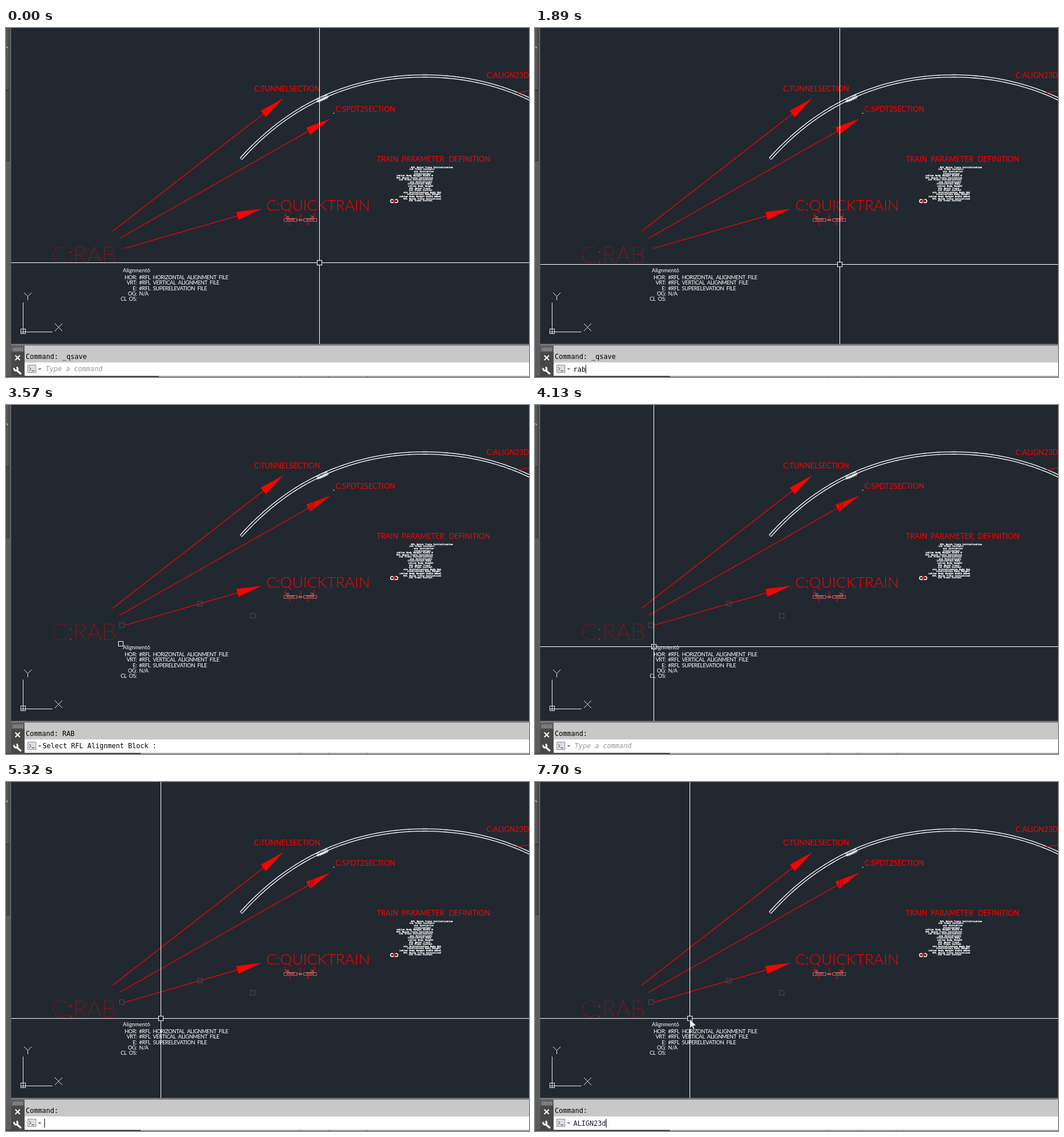
An HTML page with a canvas for the animation above (8000 ms loop, 900 by 600 pixels).

```html
<!DOCTYPE html>
<html lang="en">
<head>
<meta charset="utf-8">
<style>
html, body { margin: 0; width: 100%; height: 100%; overflow: hidden; background: #212830; }
canvas { display: block; }
</style>
</head>
<body>
<canvas id="stage" width="900" height="600"></canvas>
<script>
const ctx = document.getElementById('stage').getContext('2d');
const LOOP = 8000, TICK = 70;
const BG = '#212830', RED = '#ff0000', WHITE = '#ffffff';
const DRAFT = 'Lato, sans-serif', MONO = '"DejaVu Sans Mono", monospace';

// Input line: null shows the placeholder
const inputs = [
  [0, null], [1400, ''], [1470, 'r'], [1610, 'ra'], [1890, 'rab'],
  [2380, 'Select RFL Alignment Block :'], [4130, null], [5320, ''],
  [5390, 'A'], [5530, 'AL'], [5740, 'ALI'], [5880, 'ALIG'], [6090, 'ALIGN'],
  [6930, 'ALIGN2'], [7490, 'ALIGN23'], [7700, 'ALIGN23d']
];
const history = [[0, 'Command: _qsave'], [2380, 'Command: RAB'], [4130, 'Command:']];

// Pointer path: time, x, y
const path = [
  [0, 539, 403], [210, 524, 406], [2660, 524, 406], [2940, 424, 362],
  [3080, 333, 341], [3150, 285, 335], [3290, 199, 378], [3360, 172, 395],
  [3500, 196, 409], [3570, 197, 410], [3780, 204, 415], [4200, 204, 415],
  [4480, 266, 406], [LOOP, 266, 406]
];
const ghosts = [[3010, 424, 362], [3150, 333, 341], [3360, 199, 378]];

const latest = (list, t) => list.filter(entry => entry[0] <= t).pop()[1];
const within = (t, from, to) => t >= from && t < to;

function pointerAt(t) {
  const i = path.findIndex(p => p[0] > t);
  const [t0, x0, y0] = path[i - 1], [t1, x1, y1] = path[i];
  const k = (t - t0) / (t1 - t0);
  return [Math.round(x0 + (x1 - x0) * k), Math.round(y0 + (y1 - y0) * k)];
}

function rect(x, y, w, h, color) {
  ctx.fillStyle = color;
  ctx.fillRect(x, y, w, h);
}

function square(x, y, color = WHITE) {
  ctx.strokeStyle = color;
  ctx.lineWidth = 1;
  ctx.strokeRect(x - 3.5, y - 3.5, 8, 8);
}

function line(points, color, width = 1) {
  ctx.strokeStyle = color;
  ctx.lineWidth = width;
  ctx.beginPath();
  points.forEach(([x, y]) => ctx.lineTo(x, y));
  ctx.stroke();
}

function shape(points, color) {
  ctx.fillStyle = color;
  ctx.beginPath();
  points.forEach(([x, y]) => ctx.lineTo(x, y));
  ctx.fill();
}

function text(str, x, y, font, color, align = 'left') {
  ctx.font = font;
  ctx.fillStyle = color;
  ctx.textAlign = align;
  ctx.fillText(str, x, y);
}

function arrow(x0, y0, x1, y1) {
  const angle = Math.atan2(y1 - y0, x1 - x0), length = Math.hypot(x1 - x0, y1 - y0);
  ctx.save();
  ctx.translate(x0, y0);
  ctx.rotate(angle);
  line([[0, 0], [length - 43, 0]], RED, 1.2);
  shape([[length, 0], [length - 43.5, -7], [length - 43.5, 7]], RED);
  ctx.restore();
}

function track(offset) {
  const points = [];
  for (let x = 403; x <= 910; x += 3) {
    const d = x - 720;
    const y = 80.5 + 0.0010994 * d ** 2 + 3.22e-9 * d ** 4;
    const slope = 0.0021988 * d + 1.288e-8 * d ** 3;
    const norm = Math.hypot(1, slope);
    points.push([x - offset * slope / norm, y + offset / norm]);
  }
  line(points, WHITE, 1.3);
  return points[0];
}

function drawTrain() {
  const color = '#c85a5a';
  ctx.lineWidth = 1;
  ctx.strokeStyle = color;
  for (const x of [478.5, 512.5]) {
    ctx.strokeRect(x, 327.5, 22, 5);
    ctx.strokeRect(x + 5, 328.5, 12, 2);
  }
  line([[500, 330], [512, 330]], color);
  ctx.strokeRect(504.5, 328.5, 4, 3);
  for (const x of [484, 527]) {
    line([[x - 3, 327], [x + 2, 323], [x + 2, 327], [x - 3, 322]], color);
  }
  const font = '8px ' + DRAFT;
  [['2', 478, 324], ['3', 504, 326], ['5', 528, 324], ['1', 486, 339], ['4', 517, 339]]
    .forEach(([digit, x, y]) => text(digit, x, y, font, RED));
}

const tinyRows = [
  [697, 753], [694, 737], [702, 736], [702, 733], [672, 735], [672, 735],
  [676, 735], [695, 733], [691, 735], [692, 735], [694, 733], [693, 734],
  [684, 748], [690, 750], [677, 752], [684, 750], [693, 735]
];
const tinyText = 'RFL Quick Train Initialization Body Height Width Wheel Base Offset ';

function drawParameters() {
  tinyRows.forEach(([left, right], i) => {
    const count = Math.round((right - left) / 2.41);
    const start = i * 6 % 30;
    const str = i ? (tinyText + tinyText).slice(start, start + count) : tinyText.slice(0, 30);
    for (let pass = 0; pass < 2; pass++) {
      text(str, left, 240.8 + i * 3.58, 'bold 4px ' + MONO, WHITE);
    }
  });
  ctx.strokeStyle = WHITE;
  ctx.lineWidth = 1.4;
  for (const x of [664.5, 671.5]) {
    ctx.beginPath();
    ctx.arc(x, 297.5, 2.8, 0, 7);
    ctx.stroke();
  }
  shape([[666, 294], [671, 295], [668, 303]], RED);
}

function drawLabels() {
  const small = '12.6px ' + DRAFT;
  text('C:TUNNELSECTION', 427, 109, small, RED);
  text('C:SPDT2SECTION', 567, 144, small, RED);
  text('C:ALIGN23D', 827, 86, small, RED);
  text('TRAIN', 638, 230, small, RED);
  text('PARAMETER', 681, 230, small, RED);
  text('DEFINITION', 762, 230, small, RED);
  text('C:QUICKTRAIN', 448, 313.5, '300 26px ' + DRAFT, RED);
  text('C:RAB', 79, 404, '200 40px ' + DRAFT, RED);
}

function drawAlignment(highlight) {
  const font = (highlight ? 'bold ' : '') + '9.3px ' + DRAFT;
  text('Alignment6', 201, 420, font, WHITE);
  ctx.letterSpacing = '-0.4px';
  ctx.wordSpacing = '2px';
  [['HOR:', '#RFL HORIZONTAL ALIGNMENT FILE'], ['VRT:', '#RFL VERTICAL ALIGNMENT FILE'],
   ['E:', '#RFL SUPERELEVATION FILE'], ['OG:', 'N/A'], ['CL OS:', '']]
    .forEach(([key, value], i) => {
      const y = 432 + i * 9.3;
      text(key, 225, y, font, WHITE, 'right');
      text(value, 229, y, font, WHITE);
    });
  ctx.letterSpacing = ctx.wordSpacing = '0px';
}

function drawAxes() {
  const color = '#e6e6e6';
  square(29, 521, color);
  line([[29.5, 472], [29.5, 526]], color);
  line([[25, 522.5], [80, 522.5]], color);
  line([[84, 508], [97, 521]], color);
  line([[97, 508], [84, 521]], color);
  line([[31, 455], [37.5, 461.5], [44, 455]], color);
  line([[37.5, 461], [37.5, 468]], color);
}

function drawScene(t) {
  rect(0, 0, 900, 600, BG);
  const top = track(0), bottom = track(4);
  line([top, bottom], WHITE);
  line([[880, 111.5], [900, 108]], RED);
  arrow(183.5, 349.5, 477, 121);
  arrow(195.5, 361.5, 558, 156);
  arrow(203.5, 379, 440, 311);

  ctx.save();
  ctx.translate(544, 121);
  ctx.rotate(-0.43);
  text('SECTION', 0, 0, 'bold 5px ' + MONO, WHITE, 'center');
  text('TUNNEL', 0, 4, 'bold 5px ' + MONO, WHITE, 'center');
  line([[-11, 2], [11, 2]], WHITE, 1.5);
  ctx.restore();
  rect(563, 146, 2, 1, WHITE);

  if (t >= 2380) {
    rect(524, 167, 1, 14, BG);
    rect(528, 166, 1, 13, BG);
  }
  drawLabels();
  drawTrain();
  drawParameters();
  drawAlignment(within(t, 3640, 4130));
  drawAxes();
  ghosts.filter(g => t >= g[0]).forEach(([, x, y]) => square(x, y, '#454b52'));
}

function drawPointer(t) {
  const [x, y] = pointerAt(t);
  const hidden = [1540, 2380, 6510, 7140].some(start => within(t, start, start + TICK));
  if (!hidden) {
    square(x, y);
    if (!within(t, 2450, 4130)) {
      rect(x, 0, 1, y - 4, WHITE);
      rect(x, y + 5, 1, 538 - y, WHITE);
      rect(9, y, x - 13, 1, WHITE);
      rect(x + 5, y, 895 - x, 1, WHITE);
    }
  }
  if (t >= 6510) {
    const cursor = [[0, 0], [0, 16], [3.6, 12.5], [6, 18], [8.4, 17], [6, 11.6], [11, 11.6], [0, 0]]
      .map(([dx, dy]) => [266.5 + dx, 407.5 + dy]);
    shape(cursor, WHITE);
    line(cursor, '#15191e', 0.8);
  }
}

function drawSidebar() {
  rect(0, 0, 9, 600, '#5d5d5d');
  rect(0, 0, 5, 107, '#555555');
  rect(0, 108, 5, 120, '#4a4a4a');
  ctx.strokeStyle = '#363636';
  ctx.lineWidth = 1;
  ctx.strokeRect(-2.5, -2.5, 8, 109);
  ctx.strokeRect(-2.5, 107.5, 8, 121);
  line([[0, 32.5], [2.5, 32.5], [2.5, 35]], '#c8c8c8');
}

function drawCommandBar(t) {
  rect(9, 543, 891, 3, '#777777');
  rect(9, 546, 23, 52, '#484848');
  rect(32, 546, 868, 29, '#c8c8c8');
  rect(32, 575, 868, 23, WHITE);
  rect(9, 546, 23, 11, '#606060');
  for (let x = 12; x < 29; x += 3) {
    for (let y = 550; y < 556; y += 2) rect(x, y, 2, 1, '#b4b4b4');
  }
  line([[16, 563], [24, 571]], WHITE, 2);
  line([[24, 563], [16, 571]], WHITE, 2);
  line([[18, 588], [26, 595]], WHITE, 3);
  ctx.beginPath();
  ctx.arc(17, 586, 3, -1.2, 3.6);
  ctx.stroke();

  rect(0, 598, 900, 2, '#a0a0a0');
  rect(0, 598, t < 910 ? 263 : 232, 2, '#454545');
  for (const x of [505, 555, 621]) rect(x, 598, 1, 2, '#707070');

  rect(37, 579, 15, 14, '#d9dee5');
  ctx.strokeStyle = '#8c939b';
  ctx.lineWidth = 1;
  ctx.strokeRect(37.5, 579.5, 14, 13);
  line([[40, 583], [43, 586], [40, 589]], '#32404e');
  line([[44, 589.5], [49, 589.5]], '#32404e');
  shape([[55, 585], [61, 585], [58, 588]], '#777777');

  const font = '11.63px ' + MONO;
  text(latest(history, t), 34, 569, font, '#000000');
  const input = latest(inputs, t);
  if (input === null) {
    text('Type a command', 68, 590, 'italic ' + font, '#999999');
  } else if (within(t, 2380, 4130)) {
    text(input, 63, 590, font, '#000000');
  } else {
    text(input, 66, 591, font, t < 4130 ? '#000000' : '#14143c');
    rect(66 + 7 * input.length, 579, 1, 15, '#000000');
  }
}

function frame(now) {
  const t = Math.floor(now % LOOP / TICK) * TICK;
  drawScene(t);
  drawPointer(t);
  drawSidebar();
  drawCommandBar(t);
  requestAnimationFrame(frame);
}
frame(performance.now());
</script>
</body>
</html>
```
